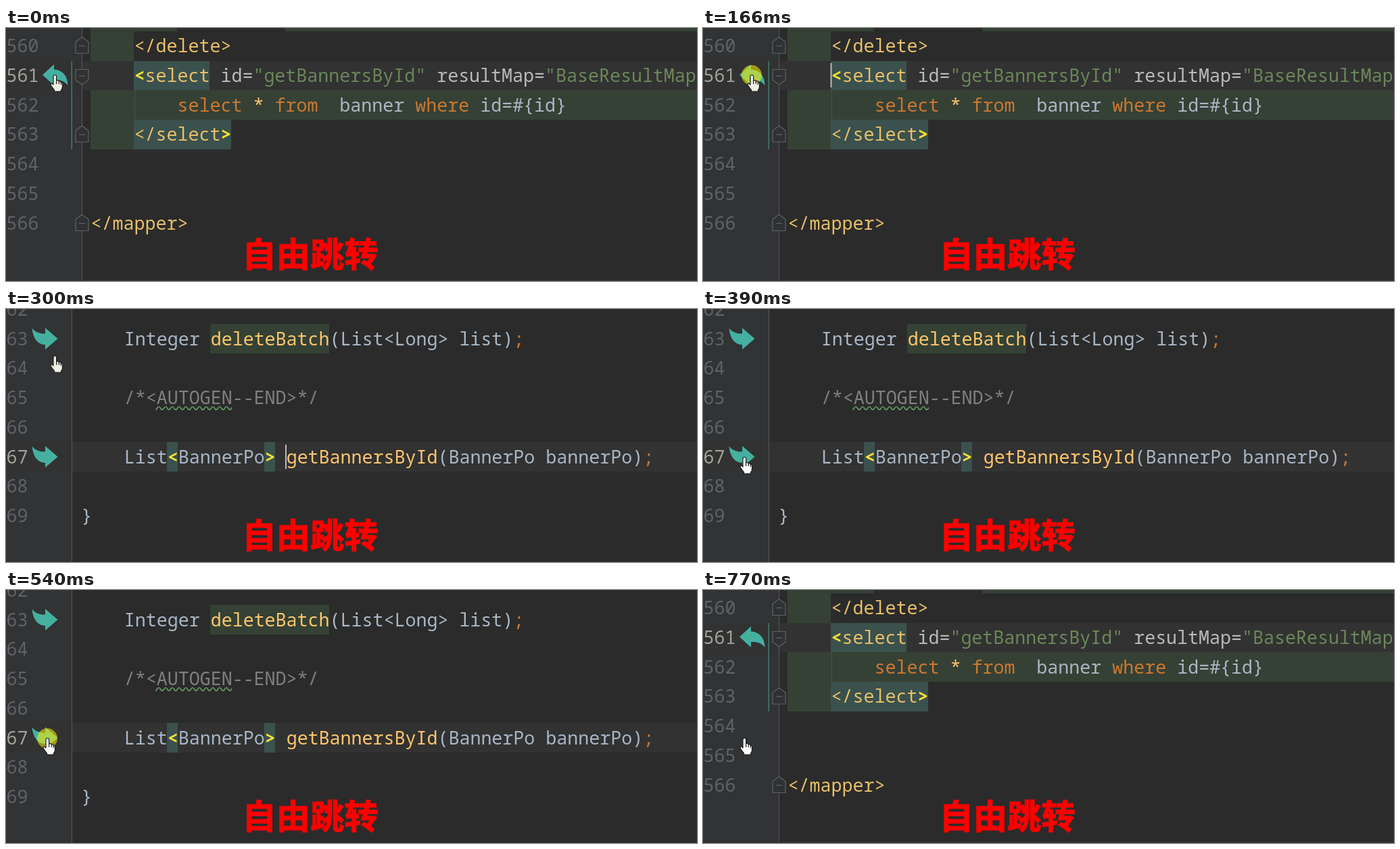
An HTML page that plays this animation: 1022 px wide and 375 px high, repeating every 850 ms.

```html
<!DOCTYPE html>
<html lang="zh-CN">
<head>
<meta charset="utf-8">
<title>自由跳转</title>
<style>
  html, body { margin: 0; width: 100%; height: 100%; overflow: hidden; background: #2b2b2b; }
  svg { display: block; width: 1022px; height: 375px; }
  text { font: 26.65px "Noto Sans Mono", "DejaVu Sans Mono", monospace; white-space: pre; fill: #a9b7c6; }

  .num text { fill: #606366; }
  .num .current { fill: #a4a39a; }
  .tag { fill: #e8bf6a; }
  .brace { fill: #fee233; font-weight: bold; }
  .attr { fill: #bababa; }
  .str { fill: #6a8759; }
  .key { fill: #cc7832; }
  .fn { fill: #ffc66d; }
  .note { fill: #808080; }

  .gutter { fill: #313335; }
  .row { fill: #323232; }
  .sql { fill: #364135; }
  .match { fill: #3b514d; }
  .edge { fill: #555759; }
  .fold { fill: #2f3133; stroke: #606366; stroke-width: 1.2; }
  .arrow { fill: #45b0a0; }
  .caret { fill: #bbb; }
  .title { font: bold 50.3px "Noto Sans CJK SC", "Noto Sans CJK", sans-serif; fill: #f00; stroke: #f00; stroke-width: 1.2; }

  .xml, .java, .caret, .ring, .pointer, .hand { animation: 850ms step-end infinite; }
  .xml { animation-name: xml; }
  .java { animation-name: java; }
  .caret { animation-name: caret; }
  .ring { animation-name: ring; fill: rgba(255, 238, 0, .55); }
  .pointer { animation-name: pointer; }
  .hand { animation-name: hand; stroke: #1c1c1c; stroke-width: 1.2; stroke-linejoin: round; }

  @keyframes xml {
    0%, 90.5882% { opacity: 1; }
    35.2941% { opacity: 0; }
  }
  @keyframes java {
    0%, 90.5882% { opacity: 0; }
    35.2941% { opacity: 1; }
  }
  @keyframes caret {
    0%, 45.8824% { opacity: 0; }
    8.2353% { opacity: 1; }
  }
  @keyframes ring {
    0%, 27.0588%, 90.5882% { opacity: 0; }
    8.2353%, 63.5294% { opacity: 1; }
  }
  @keyframes pointer {
    0% { transform: translate(72px, 70px); }
    45.8824%, 100% { transform: translate(61px, 220px); }
  }
  @keyframes hand {
    0% { fill: #f0ede2; }
    45.8824%, 100% { fill: #fff; }
  }
</style>
</head>
<body>
<svg viewBox="0 0 1022 375">
  <defs>
    <g id="fold-end" class="fold">
      <path d="M-9.5 11V-6L0-13L9.5-6V11Z"/><path d="M-4.5 0H4.5"/>
    </g>
    <g id="fold-start" class="fold">
      <path d="M-9.5-9.5H9.5V6L0 13L-9.5 6Z"/><path d="M-4.5 0H4.5"/>
    </g>
    <path id="jump" class="arrow" d="M38.5 28.5C43 34 50 37 58 36.5V28L76.5 44L58 60V53C47 53 40 44 38.5 28.5Z"/>
    <pattern id="wave" x="221" y="143" width="10" height="8" patternUnits="userSpaceOnUse">
      <path d="M-2.5 4Q0 8.5 2.500 4T7.500 4T12.500 4" fill="none" stroke="#629763" stroke-width="1.7"/>
    </pattern>
  </defs>

  <rect width="1022" height="375" fill="#2b2b2b"/>

  <g class="xml">
    <rect class="gutter" width="112" height="375"/>
    <rect class="row" y="49" width="1022" height="43"/>
    <path class="sql" d="M125 0H253V5H189V49H125ZM413 0H1022V5H413ZM125 92H1022V136H189V180H125Z"/>
    <path class="match" d="M189 49H301V92H189ZM189 136H333V180H189Z"/>
    <rect x="190" y="92" width="1" height="44" fill="#46514a"/>
    <rect x="112" class="edge" width="1" height="375"/>
    <rect x="96.5" y="49" width="1.5" height="131" fill="#437a73"/>
    <rect class="gutter" y="373" width="1022" height="2"/>
    <use href="#fold-end" x="112.5" y="26.5"/>
    <use href="#fold-start" x="112.5" y="71"/>
    <use href="#fold-end" x="112.5" y="158"/>
    <use href="#fold-end" x="112.5" y="289.5"/>
    <g class="num">
      <text x="0.5" y="36">560</text>
      <text x="0.5" y="80" class="current">561</text>
      <text x="0.5" y="124">562</text>
      <text x="0.5" y="167">563</text>
      <text x="0.5" y="211">564</text>
      <text x="0.5" y="255">565</text>
      <text x="0.5" y="299">566</text>
    </g>
    <path class="arrow" d="M54 69.5L71 54V61.5C84 62 91 71 91.5 85C86 78 80 76.5 71 77V85Z"/>
    <text x="189.5" y="36" class="tag">&lt;/delete&gt;</text>
    <text x="189.5" y="80"><tspan class="brace">&lt;</tspan><tspan class="tag">select</tspan> <tspan class="attr">id=</tspan><tspan class="str">"getBannersById"</tspan> <tspan class="attr">resultMap=</tspan><tspan class="str">"BaseResultMap</tspan></text>
    <text x="253.5" y="124"><tspan class="key">select</tspan> <tspan class="fn">*</tspan> <tspan class="key">from</tspan>  banner <tspan class="key">where</tspan> id=#{id}</text>
    <text x="189.5" y="167"><tspan class="tag">&lt;/select</tspan><tspan class="brace">&gt;</tspan></text>
    <text x="125.5" y="299" class="tag">&lt;/mapper&gt;</text>
    <rect class="caret" x="188.5" y="52" width="2" height="36"/>
  </g>

  <g class="java">
    <rect class="gutter" width="97" height="375"/>
    <rect class="row" y="197" width="1022" height="44"/>
    <rect x="97" class="edge" width="1" height="375"/>
    <rect x="302" y="22" width="176" height="44" fill="#344134"/>
    <path class="match" d="M238 197H254V241H238ZM382 197H398V241H382Z"/>
    <rect x="221" y="143" width="113" height="8" fill="url(#wave)"/>
    <g class="num">
      <text x="0.5" y="10">62</text>
      <text x="0.5" y="54">63</text>
      <text x="0.5" y="97">64</text>
      <text x="0.5" y="141">65</text>
      <text x="0.5" y="185">66</text>
      <text x="0.5" y="229" class="current">67</text>
      <text x="0.5" y="272">68</text>
      <text x="0.5" y="316">69</text>
    </g>
    <use href="#jump"/>
    <use href="#jump" y="175"/>
    <text x="174.8" y="54">Integer <tspan class="fn">deleteBatch</tspan>(List&lt;Long&gt; list)<tspan class="key">;</tspan></text>
    <text x="174.8" y="141" class="note">/*&lt;AUTOGEN--END&gt;*/</text>
    <text x="174.8" y="229">List<tspan class="brace">&lt;</tspan>BannerPo<tspan class="brace">&gt;</tspan> <tspan class="fn">getBannersById</tspan>(BannerPo bannerPo)<tspan class="key">;</tspan></text>
    <text x="111.2" y="316">}</text>
    <rect class="caret" x="413" y="201" width="2" height="36"/>
  </g>

  <text class="title" x="349.5" y="354">自由跳转</text>

  <g class="pointer">
    <circle class="ring" r="15"/>
    <path class="hand" d="M-2 2Q-2-.5 .3-.5T2.6 2V8Q5 6.500 6.300 9Q8.800 8 9.300 10.500Q11.500 10 11.500 13V17Q11.500 20 9.500 22V24H-.5V22Q-3 19-5.500 15Q-6.500 12-4 12L-2 14Z"/>
    <path class="hand" d="M2.6 8V13M6.300 9V13M9.300 10.500V14"/>
  </g>
</svg>
</body>
</html>
```
